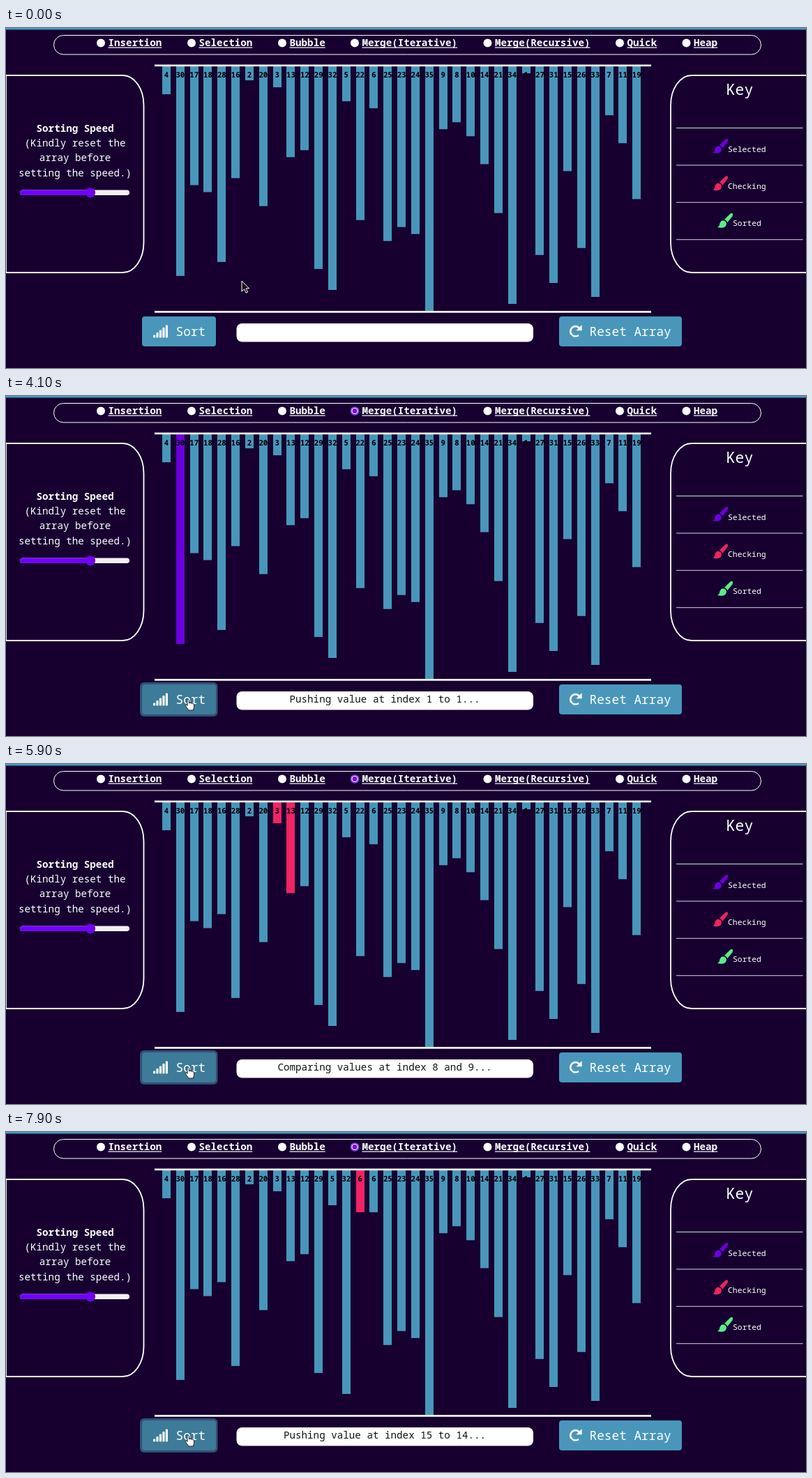
Write an HTML page with a canvas that moves like this. It is 1147 px wide and 488 px high and loops after 8 s.

```html
<!DOCTYPE html>
<html lang="en">
<head>
<meta charset="utf-8">
<title>Sorting visualizer</title>
<style>
  html, body { margin: 0; width: 100%; height: 100%; overflow: hidden; background: #170030; }
  canvas { display: block; width: 1147px; height: 488px; }
</style>
</head>
<body>
<canvas id="stage" width="1147" height="488"></canvas>
<script>
const ctx = document.getElementById('stage').getContext('2d');
const LOOP = 8000, TICK = 100, SORT_START = 3700;
const BG = '#170030', BLUE = '#4996ba', BLUE_DARK = '#3d7b98', WHITE = '#fff';
const PURPLE = '#6a00dc', RED = '#f02364', GREEN = '#58ee88', ACCENT = '#7300fa';

const VALUES = [4, 30, 17, 18, 28, 16, 2, 20, 3, 13, 12, 29, 32, 5, 22, 6, 25, 23,
  24, 35, 9, 8, 10, 14, 21, 34, 1, 27, 31, 15, 26, 33, 7, 11, 19];

// One letter per tick: A compare, B push first, X clear, C check the rest, D push it, . hold
const STEPS = 'AB.CDA.BXCDAB.CD.ABXCDA.BC.DABXCDABXCD.ABXC';

const ALGORITHMS = [[136, 'Insertion'], [266, 'Selection'], [396, 'Bubble'],
  [500, 'Merge(Iterative)'], [690.5, 'Merge(Recursive)'], [880, 'Quick'], [975.5, 'Heap']];

// Pointer stops: time, x, y
const POINTER = [[0, 338, 363], [500, 341, 350], [600, 366, 262], [700, 352, 160], [800, 330, 103],
  [1100, 288, 72], [1200, 340, 11], [1300, 410, 10], [1400, 445, 21], [1600, 455, 21],
  [1700, 482, 18], [1800, 499, 20], [1900, 501, 18], [2000, 502, 17], [2600, 420, 170],
  [2700, 311, 361], [3000, 304, 376], [3100, 286, 402], [3200, 266, 422], [3300, 257, 435]];

const ARROW = new Path2D('M0 0V15L3.6 11.8L6.2 17.2L8.6 16L6 10.8H10.6Z');
const HAND = new Path2D('M3 1.5C3 0 5.5 0 5.5 1.5V6C6 5 8 5 8 6.3C9 5.3 10.3 5.8 10.3 7' +
  'C11.3 6.3 12.6 6.8 12.6 8V11C12.6 13 11.5 14 11.5 16H4.5C4.5 14 1 11.5.4 9.5C.2 8 2 8 3 9.5Z');
const BRUSH = new Path2D('M20.5 0C22.5 0 22.8 2.4 21.3 4.6L14.4 13.3C13.5 11.3 12 9.8 9.8 9.2L18 1.3' +
  'C18.8.4 19.6 0 20.5 0ZM8.2 10.4C11 10.6 13.2 13 12.9 15.6C12.4 20.3 6.5 22.4 0 19.9' +
  'C3.4 18.8 2.8 16 4 13.3C4.9 11.3 6.3 10.3 8.2 10.4Z');

function label(str, x, y, size, { color = WHITE, bold = false, align = 'left' } = {}) {
  ctx.font = `${bold ? 'bold ' : ''}${size}px "Noto Sans Mono", monospace`;
  ctx.textAlign = align;
  ctx.fillStyle = color;
  ctx.fillText(str, x, y);
}

function rect(x, y, w, h, color) {
  ctx.fillStyle = color;
  ctx.fillRect(x, y, w, h);
}

function roundRect(x, y, w, h, radius, color) {
  ctx.beginPath();
  ctx.roundRect(x, y, w, h, radius);
  ctx.fillStyle = color;
  ctx.fill();
}

function outline(x, y, w, h, radius, width) {
  ctx.beginPath();
  ctx.roundRect(x, y, w, h, radius);
  ctx.strokeStyle = WHITE;
  ctx.lineWidth = width;
  ctx.stroke();
}

function disc(x, y, r, color) {
  ctx.beginPath();
  ctx.arc(x, y, r, 0, 2 * Math.PI);
  ctx.fillStyle = color;
  ctx.fill();
}

function icon(path, x, y, fill, stroke) {
  ctx.save();
  ctx.translate(x, y);
  ctx.fillStyle = fill;
  ctx.fill(path);
  if (stroke) {
    ctx.strokeStyle = stroke;
    ctx.lineWidth = 1;
    ctx.stroke(path);
  }
  ctx.restore();
}

function sortState(t) {
  const bars = VALUES.slice();
  let marks = {}, message = '', pair = -1, first, rest;
  const count = Math.floor((t - SORT_START) / TICK) + 1;
  for (const step of STEPS.slice(0, Math.max(0, count))) {
    if (step === '.') continue;
    if (step === 'A') pair++;
    const left = 2 * pair, right = left + 1;
    marks = {};
    if (step === 'A') {
      [first, rest] = VALUES[left] <= VALUES[right] ? [left, right] : [right, left];
      marks = { [left]: RED, [right]: RED };
      if (pair) message = `Comparing values at index ${left} and ${right}...`;
    } else if (step === 'B') {
      bars[left] = VALUES[first];
      marks[left] = PURPLE;
      message = `Pushing value at index ${first} to ${left}...`;
    } else if (step === 'C') {
      marks[rest] = RED;
    } else if (step === 'D') {
      bars[right] = VALUES[rest];
      marks[right] = PURPLE;
      message = `Pushing value at index ${rest} to ${right}...`;
    }
  }
  return { bars, marks, message };
}

function drawMenu(t) {
  rect(0, 0, 1147, 2.5, BLUE);
  outline(68.5, 10.5, 1014, 27.5, 13.75, 1);
  ALGORITHMS.forEach(([x, name], i) => {
    disc(x, 21.5, 6, WHITE);
    if (i === 3 && t >= 2200) {
      disc(x, 21.5, 5.8, ACCENT);
      disc(x, 21.5, 4.6, WHITE);
      disc(x, 21.5, 3.4, ACCENT);
    } else if (i === 3 && t >= 2000) {
      disc(x, 21.5, 5, '#eee');
    }
    label(name, x + 10.5, 26, 14.22, { bold: true });
    rect(x + 10.5, 27.5, ctx.measureText(name).width, 1.2, WHITE);
  });
}

function drawSpeedPanel() {
  const corner = { x: 30, y: 43 };
  outline(0, 68, 197.5, 283, [0, corner, corner, 0], 1.8);
  const centered = { align: 'center' };
  label('Sorting Speed', 99, 148.5, 14.22, { bold: true, align: 'center' });
  ['(Kindly reset the', 'array before', 'setting the speed.)'].forEach((line, i) =>
    label(line, 99, 170 + 21.4 * i, 14.22, centered));
  roundRect(20, 232.5, 157, 7.5, 3.75, '#f2f0f4');
  roundRect(20, 232.5, 101, 7.5, 3.75, ACCENT);
  disc(121, 236.2, 7, ACCENT);
}

function drawKeyPanel() {
  const corner = { x: 30, y: 43 };
  outline(953, 68, 200, 283, [corner, 0, 0, corner], 1.8);
  label('Key', 1052, 96, 21.33, { align: 'center' });
  for (let i = 0; i < 4; i++) rect(961, 143 + 53.4 * i, 181.5, 1, '#d8d4de');
  [['Selected', PURPLE, 1035], ['Checking', RED, 1035], ['Sorted', GREEN, 1042]].forEach(([name, color, x], i) => {
    const y = 177.5 + 53.4 * i;
    icon(BRUSH, x - 22, y - 18.5, color);
    label(name, x, y, 11.38);
  });
}

function drawBars({ bars, marks }) {
  bars.forEach((value, i) => {
    const x = 230 + 19.83 * i;
    rect(Math.round(x - 6), 55, 12, value * 10.03, marks[i] || BLUE);
    label(value, x, 71, 10.67, { color: '#000', bold: true, align: 'center' });
  });
  rect(213, 52.5, 712, 2.6, WHITE);
  rect(213, 406, 712, 2.7, WHITE);
}

function drawControls(t, message) {
  if (t >= 3600) roundRect(192, 411, 111.5, 49, 6, t < 3700 ? '#27365c' : '#344f78');
  roundRect(195, 414, 106, 43, 4, t >= 3200 ? BLUE_DARK : BLUE);
  for (let i = 0; i < 5; i++) {
    const h = 4 + 3.5 * i;
    roundRect(211 + 4.45 * i, 444.5 - h, 3.2, h, 1, WHITE);
  }
  label('Sort', 243.5, 442, 17.78);

  roundRect(330.5, 424, 425.5, 26.5, 8, WHITE);
  label(message, 543, 440, 14.22, { color: '#111', align: 'center' });

  roundRect(793, 414, 176, 43, 4, BLUE);
  ctx.beginPath();
  ctx.arc(816.5, 435.3, 7.2, 0.9, 5.6);
  ctx.strokeStyle = WHITE;
  ctx.lineWidth = 2.6;
  ctx.stroke();
  icon(new Path2D('M0 8H8.2V0Z'), 817.4, 426.3, WHITE);
  label('Reset Array', 836.5, 442, 17.78);
}

function drawPointer(t) {
  const [, x, y] = POINTER.findLast(stop => stop[0] <= t);
  if (t < 3200) icon(ARROW, x, y, '#111', WHITE);
  else icon(HAND, x, y, WHITE, '#222');
}

function draw(t) {
  const state = sortState(t);
  rect(0, 0, 1147, 488, BG);
  drawMenu(t);
  drawSpeedPanel();
  drawKeyPanel();
  drawBars(state);
  drawControls(t, state.message);
  drawPointer(t);
}

const start = performance.now();
function frame() {
  draw((performance.now() - start) % LOOP);
  requestAnimationFrame(frame);
}
frame();
</script>
</body>
</html>
```
